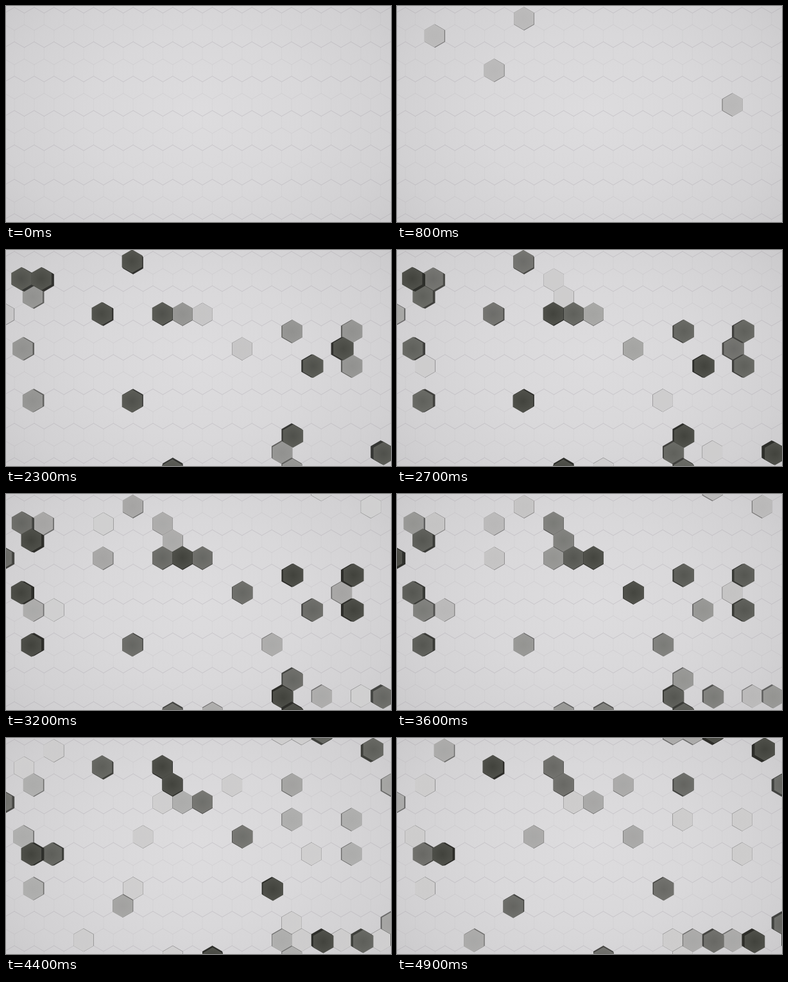
Write an HTML page with a canvas that moves like this. It is 600x338 px and loops after 5000 ms.

```html
<!DOCTYPE html>
<html lang="en">
<head>
<meta charset="utf-8">
<title>Rising hexagons</title>
<style>
  html, body { margin: 0; width: 100%; height: 100%; overflow: hidden; background: #d8d7d8; }
  canvas { display: block; width: 600px; height: 338px; }
</style>
</head>
<body>
<canvas id="stage"></canvas>
<script>
const W = 600, H = 338, LOOP = 5000, STEP = 100, HOLD = 300;
const PITCH_X = 30.85, PITCH_Y = 26.9, RADIUS = 17.9, LIFT = 0.018;
const FIRST_PEAK = 2060, WAVE_GAP = 560;

// Each wave lists its starting cells (column, row). A trail spreads from a
// start to its neighbours: a direction, then how many waves later.
const WAVES = [
  [[16, 5, "NE2"], [4, 3], [5, 0], [1, 1, "W1 SE1"]],
  [[7, 3, "E1 E1"], [5, 8, "SW5"], [13, 10, "SW1 SE0"], [18, 11, "NE5 SE0"], [14, 6], [7, 12]],
  [[13, 4], [16, 6], [0, 8], [0, 5, "SE2 E1"]],
  [[-1, 3], [11, 5]],
  [[7, 1, "SE0"], [15, 11, "W3"], [12, 8], [9, 12]],
  [[17, 0], [15, -1, "W2 W0"], [4, 1], [17, 11, "W2"]],
  [[18, 2], [13, 2]],
  [[1, 0], [10, 2], [6, 5], [3, 11]]
];

const canvas = document.getElementById("stage");
const ctx = canvas.getContext("2d");
const scale = window.devicePixelRatio || 1;
canvas.width = W * scale;
canvas.height = H * scale;
ctx.scale(scale, scale);

const mix = (a, b, k) => a + (b - a) * k;
const rgb = c => `rgb(${c.map(Math.round).join(",")})`;
const centre = (col, row) => [
  28.5 + PITCH_X * (col + (row % 2 === 0 ? 0.5 : 0)),
  20.1 + PITCH_Y * row
];

function growTrail([col, row, trail = ""], wave) {
  let [x, y] = centre(col, row);
  const cells = [{ x, y, wave }];
  for (const [, dir, wait] of trail.matchAll(/([NSEW]+)(\d)/g)) {
    const slanted = dir.length > 1;
    x += PITCH_X * (dir.endsWith("E") ? 1 : -1) * (slanted ? 0.5 : 1);
    if (slanted) y += PITCH_Y * (dir[0] === "S" ? 1 : -1);
    wave += Number(wait);
    cells.push({ x, y, wave });
  }
  return cells;
}

const cells = WAVES.flatMap((starts, wave) =>
  starts.flatMap(start => growTrail(start, wave)));

function height(wave, t) {
  const d = (t - FIRST_PEAK - wave * WAVE_GAP) / 1000;
  const bell = Math.exp(-(d < 0 ? 0.95 : 0.8) * d * d);
  return Math.max(0, (bell - 0.04) / 0.96);
}

function hexPath(x, y, r) {
  ctx.beginPath();
  for (let i = 0; i < 6; i++) {
    const a = Math.PI * (i / 3 - 0.5);
    ctx.lineTo(x + r * Math.cos(a), y + r * Math.sin(a));
  }
  ctx.closePath();
}

function drawGround() {
  ctx.save();
  ctx.translate(W / 2, H / 2);
  ctx.scale(1, 0.75);
  const glow = ctx.createRadialGradient(0, 0, 0, 0, 0, 375);
  glow.addColorStop(0, "#dddcde");
  glow.addColorStop(0.45, "#d9d8da");
  glow.addColorStop(0.8, "#d2d1d3");
  glow.addColorStop(1, "#cbcacc");
  ctx.fillStyle = glow;
  ctx.fillRect(-W, -H, 2 * W, 2 * H);
  ctx.restore();

  ctx.lineWidth = 0.7;
  for (let row = -1; row < 13; row++) {
    const [x0, y0] = centre(-2, row);
    // zigzag along the top of the row
    ctx.beginPath();
    for (let i = 0; i < 46; i++) {
      ctx.lineTo(x0 + i * PITCH_X / 2, y0 - (i % 2 ? 9 : 17.9));
    }
    ctx.strokeStyle = `rgba(135,128,140,${row % 2 === 0 ? 0.34 : 0.17})`;
    ctx.stroke();
    // upright joints
    ctx.beginPath();
    for (let i = 0; i < 23; i++) {
      const x = x0 + (i + 0.5) * PITCH_X;
      ctx.moveTo(x, y0 - 9);
      ctx.lineTo(x, y0 + 9);
    }
    ctx.strokeStyle = "rgba(135,128,140,0.08)";
    ctx.stroke();
  }
}

function drawPrism({ x, y, h }) {
  const tone = dark => [mix(213, dark, h), mix(212, dark + 1, h), mix(213, dark - 5, h)];
  const lift = LIFT * Math.pow(h, 0.8);
  const at = k => [
    x + (x - W / 2) * lift * k,
    y + (y - H / 2) * lift * k,
    RADIUS * (1 + lift * k)
  ];
  ctx.fillStyle = rgb(tone(70).map(v => v * 0.65));
  for (let k = 0; k < 1; k += 0.2) {
    hexPath(...at(k));
    ctx.fill();
  }
  const [fx, fy, r] = at(1);
  const shade = ctx.createRadialGradient(fx, fy, 0, fx, fy, r);
  shade.addColorStop(0, rgb(tone(65)));
  shade.addColorStop(1, rgb(tone(80)));
  hexPath(fx, fy, r);
  ctx.fillStyle = shade;
  ctx.fill();
}

function draw(t) {
  drawGround();
  if (t < HOLD) return;
  cells.map(({ x, y, wave }) => ({ x, y, h: height(wave, t) }))
    .filter(cell => cell.h > 0.005)
    .sort((a, b) => a.h - b.h)
    .forEach(drawPrism);
}

let shown = -1;
function tick() {
  const t = Math.floor(performance.now() % LOOP / STEP) * STEP;
  if (t !== shown) {
    shown = t;
    draw(t);
  }
  requestAnimationFrame(tick);
}
tick();
</script>
</body>
</html>
```
